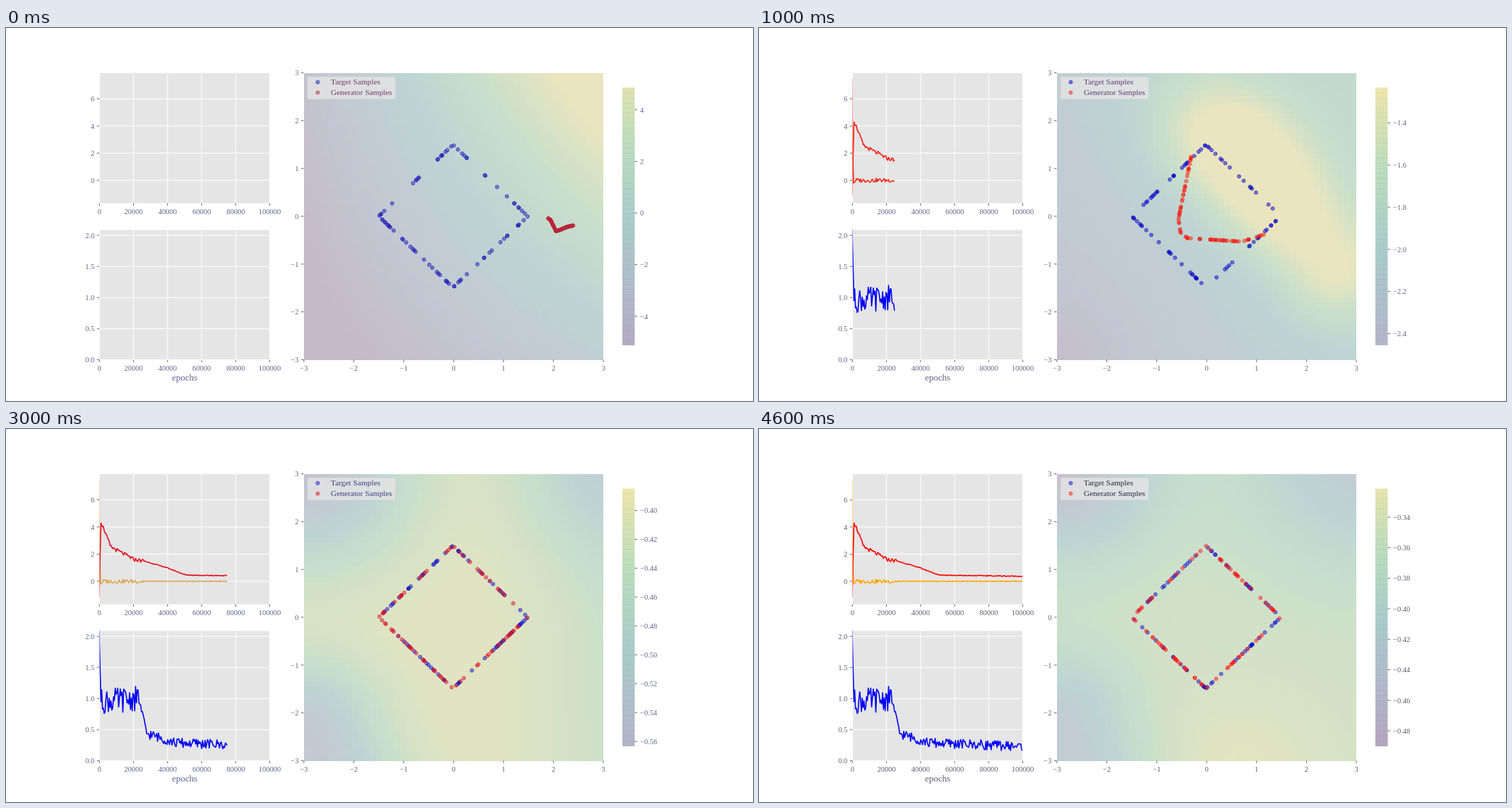
Write an HTML page with a canvas that moves like this. It is 1058x529 px and loops after 5000 ms.

```html
<!DOCTYPE html>
<html lang="en">
<head>
<meta charset="utf-8">
<title>Generator training</title>
<style>
html, body { margin: 0; width: 100%; height: 100%; overflow: hidden; background: #fff; }
canvas { display: block; }
</style>
</head>
<body>
<canvas id="stage" width="1058" height="529"></canvas>
<script>
const ctx = document.getElementById('stage').getContext('2d');
const SERIF = '"Liberation Serif", serif';
const PANEL = '#e5e5e5';
const VIRIDIS = [[68, 1, 84], [59, 82, 139], [33, 145, 140], [94, 201, 98], [253, 231, 37]];
const DIAMOND = [[528, 267], [633, 165.5], [739, 267], [633, 368], [528, 267]];
const clamp = (v, lo, hi) => Math.min(hi, Math.max(lo, v));

// Soft bump of radius r around the segment a-b, or around the point a.
function near(x, y, r, [ax, ay], [bx, by] = [ax, ay]) {
  const dx = bx - ax, dy = by - ay;
  const t = clamp(((x - ax) * dx + (y - ay) * dy) / (dx * dx + dy * dy || 1), 0, 1);
  return Math.exp(-((x - ax - t * dx) ** 2 + (y - ay - t * dy) ** 2) / (r * r));
}

// field: colour map position (0..1) at plot coordinates; strokes: curves the generator samples lie on.
const scenes = [
  {
    field: (x, y) => clamp(.42 + .115 * x + .08 * y + .015 * x * y, .05, 1),
    strokes: [[[768, 270], [771, 272], [779, 288], [783, 287], [795, 282], [804, 280]]],
    blue: '#2424c8', red: '#c42838', rim: '#b02438', ink: '#62618c', legendInk: '#703c6c',
    bar: { top: .93, bottom: .1, first: 4, step: -2, count: 5, digits: 0, y: 116, gap: 73.2 }
  },
  {
    field: (x, y) => .42 + .04 * x + .025 * y - .12 * near(x, y, 1.5, [-3, -3])
      + .27 * near(x, y, 1.4, [-.2, 2.1], [1, 1]) + .5 * near(x, y, 1.2, [.6, 1.4], [2.6, -1.1]),
    strokes: [[[613, 178], [594, 271], [597, 290], [607, 298], [684, 303], [718, 292]]],
    blue: '#0000f0', red: '#fa2014', rim: '#e83028', ink: '#695f86', legendInk: '#5d3b78', loss: '#f51c12', zero: '#ee2c18',
    bar: { top: 1, bottom: .2, first: -1.4, step: -.2, count: 6, digits: 1, y: 134.5, gap: 59.8 }
  },
  {
    field: (x, y) => .79 - .025 * x * x + .033 * x - .03 * y * y - .033 * y - .01 * x * y
      + .18 * near(x, y, .5, [1.3, .2], [3, -1.4]) + .2 * near(x, y, .7, [-.5, 2]) + .08 * near(x, y, .7, [.8, 1.4]),
    strokes: [
      [[530, 258], [557, 234], [637, 172]],
      [[677, 185], [703, 231], [722, 267], [722, 278], [707, 313], [672, 342], [634, 363], [610, 342], [563, 296], [537, 272]]],
    blue: '#0c0cde', red: '#fa1c1c', rim: '#f02830', ink: '#5d5c8d', legendInk: '#403e8e', loss: '#f40c0c', zero: '#e8a630',
    bar: { top: 1, bottom: .16, first: -.5, step: -.05, count: 5, digits: 2, y: 116.5, gap: 74.4 }
  },
  {
    field: (x, y) => .93 - .018 * Math.max(0, x) ** 2 - .78 * near(x, y, 1.9, [-3, 3.2])
      - .42 * near(x, y, 2, [3.4, 3.5]) - .65 * near(x, y, 1.35, [-3, -2.4], [-2.4, -4]),
    strokes: [DIAMOND],
    blue: '#1414f0', red: '#e81424', rim: '#c81430', ink: '#62628c', legendInk: '#3d3c80', loss: '#e20c18', zero: '#dca452',
    bar: { top: 1, bottom: .2, first: -.4, step: -.02, count: 9, digits: 2, y: 115.5, gap: 40.95 }
  },
  {
    field: (x, y) => .82 - .7 * near(x, y, 1.9, [-3, 3.3]) - .5 * near(x, y, 2.4, [3.3, 3.6])
      - .48 * near(x, y, 1.35, [-3, -2.2], [-2.5, -4]) + .13 * near(x, y, 1.7, [.7, -3.4]),
    strokes: [DIAMOND],
    blue: '#1414f5', red: '#ff1c14', rim: '#ff2c20', ink: '#5e5e72', legendInk: '#26263a', loss: '#ff0000', zero: '#ffa500',
    bar: { top: .97, bottom: .04, first: -.34, step: -.02, count: 8, digits: 2, y: 125, gap: 43.3 }
  }
];

// Training curves as [pixel x, value] key points.
const LOSS = [[131.8, -1.2], [134.5, 4.3], [137, 4.1], [148, 2.55], [182, 1.6], [195, 1.5], [225, 1.05], [255, .46], [374, .37]];
const ZERO = [[131.8, 7.5], [132.5, 2], [134, -.2], [137, 0], [374, 0]];
const DISTANCE = [[131.8, 2.1], [134.5, .95], [188, 1], [199, .44], [240, .29], [374, .23]];

// Repeatable noise in -1..1.
function noise(i, seed) {
  const s = Math.sin(i * 12.9898 + seed * 78.233) * 43758.5453;
  return (s - Math.floor(s)) * 2 - 1;
}

function valueAt(points, x) {
  const i = clamp(points.findIndex(p => p[0] >= x), 1, points.length - 1);
  const [x0, y0] = points[i - 1], [x1, y1] = points[i];
  return y0 + (y1 - y0) * (x - x0) / (x1 - x0);
}

function curve(points, endX, toY, color, seed, amplitude) {
  ctx.beginPath();
  for (const [x, v] of points) if (x < 135) ctx.lineTo(x, toY(v));
  for (let x = 135.5, i = 0; x <= endX; x += 1.2) {
    ctx.lineTo(x, toY(valueAt(points, x) + amplitude(x) * noise(++i, seed)));
  }
  ctx.strokeStyle = color;
  ctx.lineWidth = 1.6;
  ctx.lineJoin = 'round';
  ctx.stroke();
}

function drawCurves(endX, lossY, distanceY) {
  ctx.save();
  ctx.beginPath();
  ctx.rect(132.5, 64, 240.5, 407);
  ctx.clip();
  curve(ZERO, endX, lossY, scene.zero, 3, x => x < 195 ? .15 : .012);
  curve(LOSS, endX, lossY, scene.loss, 5, x => x < 195 ? .14 : .03);
  curve(DISTANCE, endX, distanceY, '#0000f5', 8, x => x < 188 ? .2 : .08);
  ctx.restore();
}

function text(str, x, y, align, size = 10.5) {
  ctx.font = size + 'px ' + SERIF;
  ctx.textAlign = align;
  ctx.fillText(str, x, y);
}

const label = (v, digits) => v.toFixed(digits).replace('-', '\u2212');

function line(x0, y0, x1, y1, color) {
  ctx.strokeStyle = color;
  ctx.lineWidth = 1;
  ctx.beginPath();
  ctx.moveTo(x0, y0);
  ctx.lineTo(x1, y1);
  ctx.stroke();
}

function xTick(x, y, str) {
  line(x, y, x, y + 3.5, '#666');
  text(str, x, y + 15, 'center');
}

function yTick(x, y, str) {
  line(x - 3.5, y, x, y, '#666');
  text(str, x - 7, y + 3.7, 'right');
}

function chart(top, bottom, step, count, toY, digits) {
  ctx.fillStyle = PANEL;
  ctx.fillRect(132.5, top, 240.5, bottom - top);
  ctx.fillStyle = scene.ink;
  for (let i = 0; i <= 5; i++) {
    const x = 132.3 + i * 48.25;
    line(x, top, x, bottom, '#fff');
    xTick(x, bottom, String(i * 20000));
  }
  for (let i = 0; i < count; i++) {
    const y = toY(i * step);
    line(132.5, y, 373, y, '#fff');
    yTick(132.3, y, label(i * step, digits));
  }
}

function tint(v, alpha) {
  const p = clamp(v, 0, 1) * 4, i = Math.min(3, Math.floor(p));
  const rgb = VIRIDIS[i].map((c, k) => Math.round(229 * (1 - alpha) + alpha * (c + (VIRIDIS[i + 1][k] - c) * (p - i))));
  return `rgb(${rgb})`;
}

function drawField(field) {
  const cells = 50, left = i => Math.round(422 + i * 424 / cells), top = j => Math.round(64 + j * 406.5 / cells);
  const coord = i => -3 + 6 * i / (cells - 1);
  for (let j = 0; j < cells; j++) {
    for (let i = 0; i < cells; i++) {
      ctx.fillStyle = tint(field(coord(i), -coord(j)), .2);
      ctx.fillRect(left(i), top(j), left(i + 1) - left(i), top(j + 1) - top(j));
    }
  }
}

function dot(x, y, fill, rim) {
  ctx.beginPath();
  ctx.arc(x, y, 2.5, 0, Math.PI * 2);
  ctx.globalAlpha = .48;
  ctx.fillStyle = fill;
  ctx.fill();
  ctx.globalAlpha = .6;
  ctx.strokeStyle = rim;
  ctx.lineWidth = 1;
  ctx.stroke();
  ctx.globalAlpha = 1;
}

// Scatters dots evenly at random over the whole length of the strokes.
function scatter(strokes, seed, fill, rim) {
  const segments = strokes.flatMap(points => points.slice(1).map((b, i) => {
    const a = points[i];
    return { a, b, length: Math.hypot(b[0] - a[0], b[1] - a[1]) };
  }));
  const total = segments.reduce((sum, s) => sum + s.length, 0);
  for (let n = 1; n <= 80; n++) {
    let at = (noise(n, seed) + 1) / 2 * total, k = 0;
    while (k < segments.length - 1 && at > segments[k].length) at -= segments[k++].length;
    const { a, b, length } = segments[k], t = at / length;
    dot(a[0] + t * (b[0] - a[0]), a[1] + t * (b[1] - a[1]), fill, rim);
  }
}

function drawLegend() {
  ctx.beginPath();
  ctx.roundRect(427, 69, 125, 32, 2);
  ctx.fillStyle = 'rgba(229,229,229,.8)';
  ctx.fill();
  ctx.strokeStyle = '#ccd0d0';
  ctx.lineWidth = 1;
  ctx.stroke();
  dot(441.5, 76.8, scene.blue, '#1010a0');
  dot(441.5, 91.6, scene.red, scene.rim);
  ctx.fillStyle = scene.legendInk;
  text('Target Samples', 460, 80.3, 'left', 11.4);
  text('Generator Samples', 460, 95.2, 'left', 11.4);
}

function drawColorBar({ top, bottom, first, step, count, digits, y, gap }) {
  const gradient = ctx.createLinearGradient(0, 84.5, 0, 450);
  for (let i = 0; i <= 16; i++) gradient.addColorStop(i / 16, tint(top + (bottom - top) * i / 16, .3));
  ctx.fillStyle = gradient;
  ctx.fillRect(873, 84.5, 17.5, 365.5);
  for (let s = 92; s < 448; s += 7.15) line(873, s, 890.5, s, 'rgba(60,80,110,.07)');
  ctx.fillStyle = scene.ink;
  for (let i = 0; i < count; i++) {
    line(890.5, y + i * gap, 894, y + i * gap, '#666');
    text(label(first + i * step, digits), 898, y + i * gap + 3.7, 'left');
  }
}

let scene;
function draw(index) {
  scene = scenes[index];
  ctx.fillStyle = '#fff';
  ctx.fillRect(0, 0, 1058, 529);

  const lossY = v => 216 - v * 19.25, distanceY = v => 470.5 - v * 88.2;
  chart(64, 248.5, 2, 4, lossY, 0);
  chart(286.5, 470.5, .5, 5, distanceY, 1);
  text('epochs', 253, 500, 'center', 13);
  if (index > 0) drawCurves(132.3 + index * 60.3, lossY, distanceY);

  drawField(scene.field);
  ctx.fillStyle = scene.ink;
  for (let v = -3; v <= 3; v++) {
    xTick(634 + v * 70.7, 470.5, label(v, 0));
    yTick(421.5, 267 - v * 67.8, label(v, 0));
  }
  scatter([DIAMOND], index + 11, scene.blue, '#1010a0');
  scatter(scene.strokes, index + 31, scene.red, scene.rim);
  drawLegend();
  drawColorBar(scene.bar);
}

let shown = -1;
function tick() {
  const index = Math.floor(performance.now() % 5000 / 1000);
  if (index !== shown) draw(shown = index);
  requestAnimationFrame(tick);
}
tick();
</script>
</body>
</html>
```
